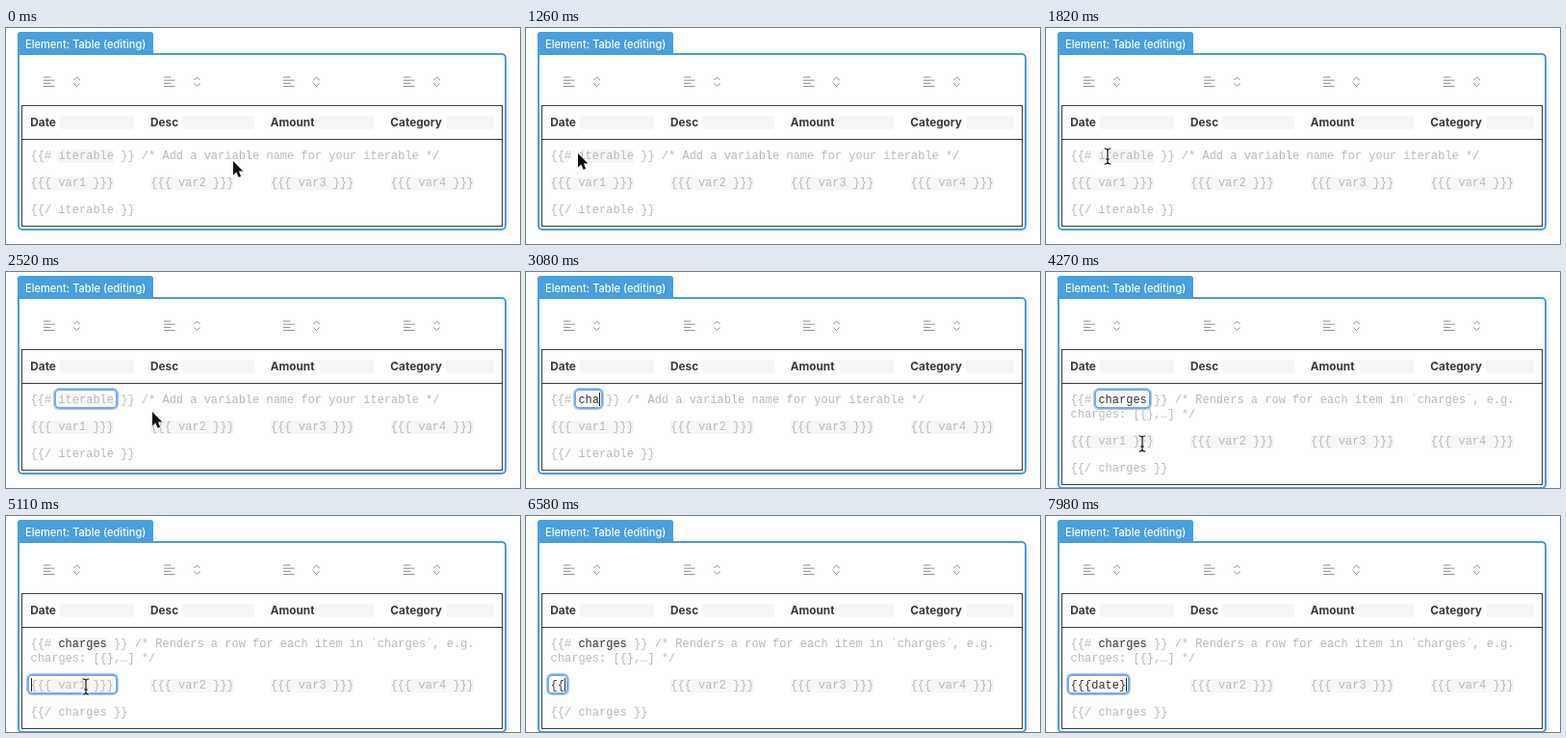
Write an HTML page that moves like this. It is 534 px wide and 224 px high and loops after 8 s.

```html
<!DOCTYPE html>
<html lang="en">
<head>
<meta charset="utf-8">
<title>Table editor</title>
<style>
  html, body { margin: 0; width: 100%; height: 100%; overflow: hidden; background: #fff; }
  #stage { position: relative; width: 534px; height: 224px; overflow: hidden; background: #fff; font-family: Inter, sans-serif; }
  .tab { position: absolute; left: 12px; top: 4px; width: 141px; height: 24px; box-sizing: border-box; padding-left: 8px;
    border-radius: 3px 3px 0 0; background: #479fde; color: #fff; font-size: 11.1px; font-weight: 500; line-height: 27px; white-space: nowrap; }
  .panel { position: absolute; left: 12px; top: 26px; width: 508px; box-sizing: border-box; padding: 52px 2px 2px;
    border: 2px solid #479fde; border-radius: 0 5px 5px 5px; }
  .table { border: 1px solid #3c3c3c; }
  .row { display: flex; }
  .row > * { flex: none; width: 124.7px; box-sizing: border-box; }
  .head { height: 34px; padding-left: 8.3px; align-items: center; border-bottom: 1px solid #3c3c3c; overflow: hidden; }
  .head > div { display: flex; padding-right: 17px; color: #3a3a3a; font-size: 11.8px; font-weight: 700; line-height: 14px; }
  .head i { flex: 1; margin-left: 4px; height: 14px; border-radius: 3px; background: #f6f6f6; }
  .body { padding: 10px 9px 8px 8.6px; color: #b8b8b8; font: 12px/15px "Liberation Mono", monospace; }
  .body > * + * { margin-top: 13px; }
  .field { position: relative; display: inline-block; vertical-align: top; height: 14px; background: #f6f6f6; border-radius: 2px; white-space: pre; }
  .filled { color: #333; }
  .focus.filled { background: #fff; }
  .focus::after { content: ""; position: absolute; inset: -5px -4px -2px; border: 2px solid #74a9f2; border-radius: 5px; box-shadow: 0 0 0 1px #a9cbf7; }
  .caret { position: absolute; top: -1px; width: 1px; height: 14px; background: #222; }
  svg { position: absolute; left: 0; top: 0; }
</style>
</head>
<body>
<div id="stage">
  <div class="tab">Element: Table (editing)</div>
  <div class="panel"><div class="table">
    <div class="row head" id="head"></div>
    <div class="body">
      <div>{{# <span class="field" id="list"></span> }} <span id="note"></span></div>
      <div class="row" id="vars"></div>
      <div>{{/ <span id="end"></span> }}</div>
    </div>
  </div></div>
  <svg width="534" height="224" fill="none">
    <defs>
      <g id="tools" stroke="#8c8c8c">
        <path d="M39 51h7.5M39 54.2h11.5M39 57.4h7.5M39 60.6h11.5"/>
        <path d="M70.5 54l3-3 3 3M70.5 57.5l3 3 3-3"/>
      </g>
      <path id="bar" d="M-3 -8Q0 -8 0 -6Q0 -8 3 -8M0 -6V6M-3 8Q0 8 0 6Q0 8 3 8M-1.5 3H1.5"/>
    </defs>
    <g id="icons"></g>
    <path id="arrow" d="M0 0V14.5L3.3 11.5 5.6 16.8 8.1 15.7 5.9 10.6H10.3Z" fill="#111" stroke="#fff" paint-order="stroke"/>
    <g id="beam" stroke-linecap="round">
      <use href="#bar" stroke="#fff" stroke-width="3"/>
      <use href="#bar" stroke="#111" stroke-width="1.2"/>
    </g>
  </svg>
</div>
<script>
const $ = id => document.getElementById(id);
const LOOP = 8000, STEP = 70, BLINK = 560;

$('head').innerHTML = ['Date', 'Desc', 'Amount', 'Category'].map(s => `<div>${s}<i></i></div>`).join('');
$('vars').innerHTML = [1, 2, 3, 4].map(n => `<div><span class="field" id="var${n}">{{{ var${n} }}}</span></div>`).join('');
$('icons').innerHTML = [0, 1, 2, 3].map(n => `<use href="#tools" x="${Math.round(n * 124.7)}"/>`).join('');

const inputs = [
  { el: $('list'), hint: 'iterable', word: 'charges', focus: 1960, blur: 5040,
    keys: [2870, 3010, 3080, 3290, 3500, 3570, 3640] },
  { el: $('var1'), hint: '{{{ var1 }}}', word: '{{{date}', focus: 5040, blur: LOOP,
    keys: [6300, 6510, 6650, 6860, 7000, 7140, 7210, 7910] }
];

// Pointer path: time, x, y
const path = [
  [0, 236, 138], [350, 150, 142], [630, 70, 143], [840, 70, 143], [1260, 54, 130],
  [1680, 47, 133], [1960, 80, 133], [2310, 152, 145], [4130, 152, 145], [4200, 130, 160],
  [4270, 100, 178], [4410, 90, 180], [4480, 90, 180], [4830, 84, 181], [5040, 83, 177],
  [5110, 83, 177], [5320, 190, 175], [LOOP, 190, 175]
];

function pointAt(t) {
  const i = path.findIndex(p => p[0] > t);
  const [t0, x0, y0] = path[i - 1], [t1, x1, y1] = path[i];
  const k = (t - t0) / (t1 - t0);
  return [x0 + (x1 - x0) * k, y0 + (y1 - y0) * k];
}

function drawInput({ el, hint, word, focus, blur, keys }, t) {
  const typed = keys.filter(k => k <= t);
  const n = typed.length;
  const active = t >= focus && t < blur;
  el.textContent = n ? word.slice(0, n) : hint;
  el.classList.toggle('filled', n > 0);
  el.classList.toggle('focus', active);
  const since = t - (n ? typed[n - 1] : focus);
  if (active && Math.floor(since / BLINK) % 2 === 0) {
    const caret = document.createElement('span');
    caret.className = 'caret';
    caret.style.left = n + 'ch';
    el.append(caret);
  }
}

function drawPointer(t) {
  const hidden = (t >= 2870 && t < 4200) || t >= 6300;
  const [x, y] = pointAt(t);
  const stage = $('stage').getBoundingClientRect();
  const px = x + stage.left, py = y + stage.top;
  const overText = [...document.querySelectorAll('.field')].some(f => {
    const r = f.getBoundingClientRect();
    return px >= r.left && px <= r.right && py >= r.top && py <= r.bottom;
  });
  for (const id of ['arrow', 'beam']) {
    const el = $(id);
    el.setAttribute('transform', `translate(${Math.round(x)} ${Math.round(y)})`);
    el.style.display = !hidden && overText === (id === 'beam') ? '' : 'none';
  }
}

function draw(now) {
  const t = Math.floor((now % LOOP) / STEP) * STEP;
  const named = t >= 4200;
  inputs.forEach(i => drawInput(i, t));
  $('note').textContent = named
    ? '/* Renders a row for each item in `charges`, e.g. charges: [{},…] */'
    : '/* Add a variable name for your iterable */';
  $('end').textContent = named ? 'charges' : 'iterable';
  drawPointer(t);
}

const start = performance.now();
function tick() {
  draw(performance.now() - start);
  requestAnimationFrame(tick);
}
tick();
</script>
</body>
</html>
```
